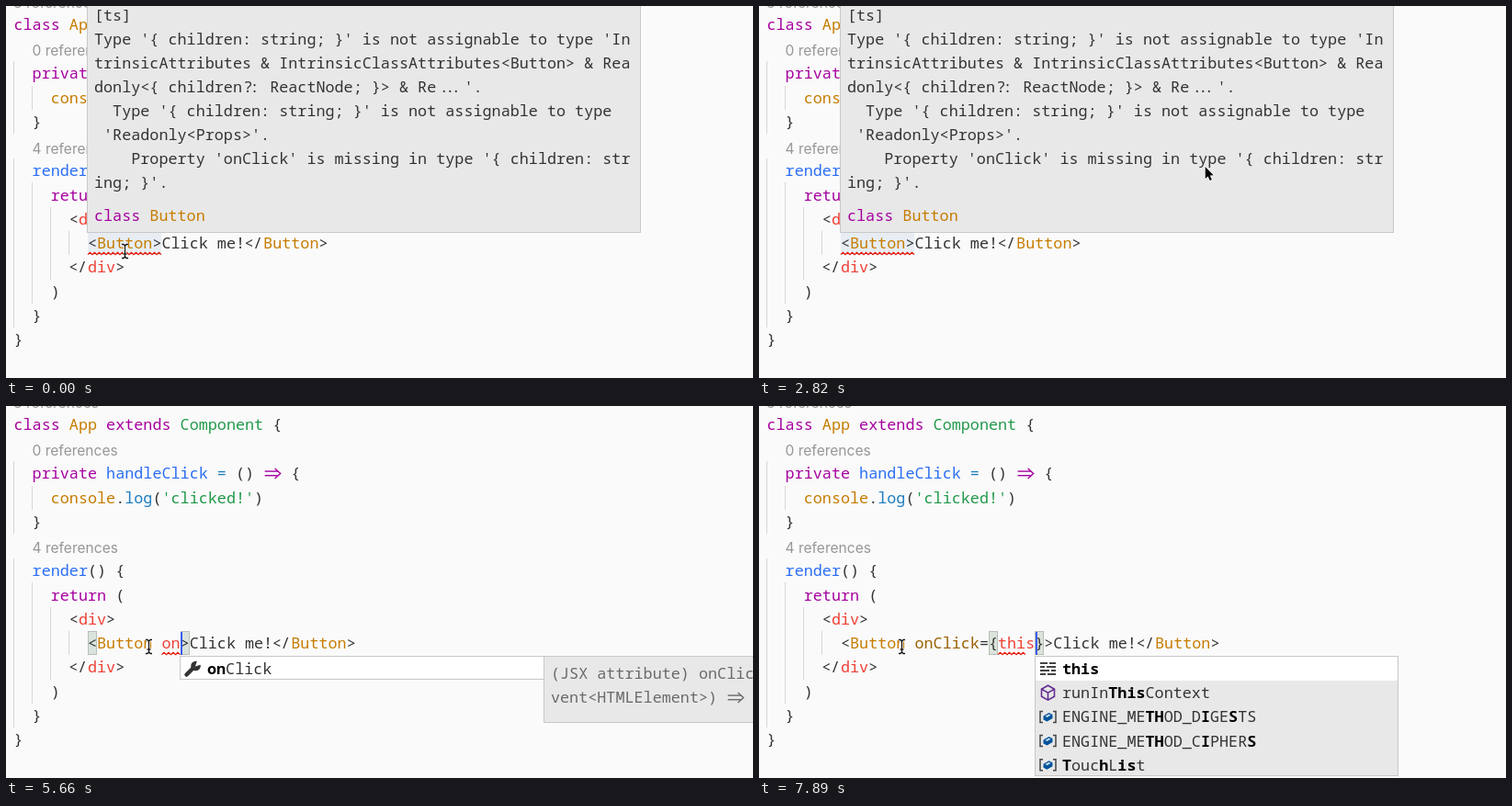
An HTML page with a canvas that plays this animation: 813 by 405 pixels, repeating every 8 s.

```html
<!DOCTYPE html>
<html lang="en">
<head>
<meta charset="utf-8">
<title>Editor: missing prop</title>
<style>
html, body { margin: 0; width: 100%; height: 100%; overflow: hidden; background: #fafafa; }
canvas { display: block; width: 813px; height: 405px; }
</style>
</head>
<body>
<canvas id="stage"></canvas>
<script>
const W = 813, H = 405, LOOP = 8000;
const ADV = 10.06, LEFT = 8.5, ROW = 26.25, CODE_Y = 264;
const MONO = '16.76px "Noto Sans Mono", "DejaVu Sans Mono", monospace';
const INK = '#333333', PURPLE = '#a6009f', ORANGE = '#c67c00', BLUE = '#2a6df5',
      GREEN = '#21994a', RED = '#ee4035', BROWN = '#986000', CYAN = '#1c7cc0';

const canvas = document.getElementById('stage');
const c = canvas.getContext('2d');
const dpr = window.devicePixelRatio || 1;
canvas.width = W * dpr;
canvas.height = H * dpr;

// Time, x, y of the pointer; each position holds until the next
const pointer = [
  [0, 129, 267], [600, 131, 243], [750, 138, 190], [900, 146, 133], [1040, 150, 164],
  [1340, 172, 165], [1490, 207, 165], [1640, 239, 165], [1790, 254, 165], [1940, 294, 167],
  [2090, 362, 169], [2240, 430, 171], [2380, 470, 171], [2530, 485, 174],
  [3270, 432, 222], [3420, 318, 284], [3570, 246, 312], [3720, 229, 315],
  [3870, 219, 309], [4020, 195, 289], [4170, 168, 270], [4320, 155, 262]
];
const edits = [
  [0, ''], [4920, ' '], [5070, ' o'], [5220, ' on'], [5810, ' onClick'], [6100, ' onClick='],
  [6550, ' onClick={}'], [7290, ' onClick={th}'], [7440, ' onClick={thi}'], [7590, ' onClick={this}']
];
const blinks = [300, 900, 1340, 1790, 2380, 2820, 3270, 3720, 4170, 4320, 4620, 6990, 7290];

const colX = col => LEFT + col * ADV;
const within = (t, a, b) => t >= a && t < b;
const at = (list, t) => list.filter(k => k[0] <= t).pop();

function box(x, y, w, h, fill, edge) {
  c.fillStyle = fill;
  c.fillRect(x, y, w, h);
  if (!edge) return;
  c.strokeStyle = edge;
  c.lineWidth = 1;
  c.strokeRect(x + .5, y + .5, w - 1, h - 1);
}

function path(points, color, width, close, fill) {
  c.beginPath();
  points.forEach(([x, y]) => c.lineTo(x, y));
  if (close) c.closePath();
  if (fill) { c.fillStyle = fill; c.fill(); }
  if (width) { c.strokeStyle = color; c.lineWidth = width; c.stroke(); }
}

function arrow(x, base, color) {
  const y = base - 5.6;
  for (const d of [-2.3, 2.3]) path([[x + 1.5, y + d], [x + 16, y + d]], color, 1.4);
  path([[x + 12.5, y - 5.5], [x + 18.5, y], [x + 12.5, y + 5.5]], color, 1.4);
}

// Offsets that pull the characters of a ligature together
const joins = { '</': [-.5, -1], '...': [3.5, 0, -3.5], '?:': [1.5, -1.5] };

// Grid text; asterisks toggle bold. Returns the x after the last character.
function put(text, x, y, color = INK) {
  let bold = false;
  c.font = MONO;
  for (const part of text.match(/<\/|=>|\.\.\.|\?:|[^]/g)) {
    if (part === '*') {
      bold = !bold;
      c.font = (bold ? 'bold ' : '') + MONO;
      continue;
    }
    c.fillStyle = bold ? '#000' : color;
    if (part === '=>') arrow(x, y, color);
    else [...part].forEach((ch, i) => c.fillText(ch, x + i * ADV + (joins[part] ? joins[part][i] : 0), y));
    x += part.length * ADV;
  }
  return x;
}

function line(col, y, ...runs) {
  let x = colX(col);
  for (const [text, color] of runs) if (text) x = put(text, x, y, color);
}

function lens(text, x, y) {
  c.font = '15.55px Inter, "Open Sans", sans-serif';
  c.fillStyle = '#979797';
  c.fillText(text, x, y);
}

function squiggle(from, to) {
  const end = colX(to), pts = [];
  for (let x = colX(from), i = 0; x <= end; x += 2.5, i++) pts.push([x, i % 2 ? 268.3 : 270.6]);
  path(pts, '#e51400', 1.2);
}

function guides() {
  const bars = [[0, 60, 139], [0, 166, 350], [1, 87, 113], [1, 192, 324], [2, 219, 298], [3, 245, 271]];
  for (const [level, top, end] of bars) box(8 + level * 20, top, 1, end - top, '#d6d6d6');
}

function staticCode(t) {
  lens('3 references', 8, 1.5);
  line(0, 26, ['class ', PURPLE], ['App ', ORANGE], ['extends ', PURPLE], ['Component', GREEN], [' {']);
  lens('0 references', 28.5, 53.9);
  line(2, 79, ['private ', PURPLE], ['handleClick ', BLUE], ['= ', CYAN], ['() '], ['=>', PURPLE], [' {']);
  line(4, 105.6, ['console', ORANGE], ['.'], ['log', CYAN], ['('], ["'clicked!'", GREEN], [')']);
  line(2, 131.8, ['}']);
  lens('4 references', 28.5, t < 5070 ? 160.9 : 160);
  line(2, CODE_Y - 3 * ROW, ['render', BLUE], ['() {']);
  line(4, CODE_Y - 2 * ROW, ['return', PURPLE], [' (']);
  line(6, CODE_Y - ROW, ['<'], ['div', RED], ['>']);
  line(6, CODE_Y + ROW, ['</'], ['div', RED], ['>']);
  line(4, CODE_Y + 2 * ROW, [')']);
  line(2, CODE_Y + 3 * ROW, ['}']);
  line(0, CODE_Y + 4 * ROW, ['}']);
}

function buttonLine(t, hover) {
  const attr = at(edits, t)[1];
  const braces = attr.includes('{');
  const clicked = t >= 4620;
  const caret = clicked ? 15 + attr.length - (braces ? 1 : 0) : 20;

  if (hover) box(89, 246, 80, 25, '#e7edf3');
  if (within(t, 4620, 4920)) box(89, 245, 123, 26, '#f2f2f2');
  if (within(t, 7290, 7440)) box(250, 245, 231, 26, '#f0f0f0');
  if (clicked) {
    for (const col of [braces ? 24 : 8, caret]) {
      box(Math.round(colX(col)), 245, 10, 26, '#dae4dc', '#b9bdb9');
    }
  }

  const [name, value = ''] = attr.split('=');
  const inner = value.slice(1, -1);
  line(8, CODE_Y,
    ['<'], ['Button', ORANGE],
    [name, name === ' onClick' ? BROWN : RED],
    [attr.includes('=') ? '=' : ''],
    [braces ? '{' : ''], [inner, inner === 'this' ? RED : INK], [braces ? '}' : ''],
    ['>Click me!'], ['</'], ['Button', ORANGE], ['>']);

  if (inner === 'this') squiggle(25, 28);
  else if (braces) squiggle(24, caret + 1);
  else if (attr.length < 2) squiggle(8, 16);
  else if (!attr.includes('=')) squiggle(16, caret);

  const shown = blinks.filter(b => b <= t).length % 2;
  if (shown) box(Math.round(colX(caret) + .4), 246, 2, 25, '#3b5bef');
}

function tooltip() {
  box(88, -2, 603, 249, '#e8e8e8', '#c8c8c8');
  [
    '[ts]',
    "Type '{ children: string; }' is not assignable to type 'In",
    'trinsicAttributes & IntrinsicClassAttributes<Button> & Rea',
    "donly<{ children?: ReactNode; }> & Re...'.",
    "  Type '{ children: string; }' is not assignable to type",
    " 'Readonly<Props>'.",
    "    Property 'onClick' is missing in type '{ children: str",
    "ing; }'."
  ].forEach((text, i) => put(text, 96, 16 + i * 26));
  put('Button', put('class ', 96, 234, PURPLE), 234, ORANGE);
}

function wrench(x, y) {
  c.lineCap = 'round';
  path([[x + 2.5, y + 14.5], [x + 10, y + 7]], '#333', 4.5);
  c.lineCap = 'butt';
  c.beginPath();
  c.arc(x + 12.5, y + 5, 5.3, 0, 7);
  c.fillStyle = '#333';
  c.fill();
  path([[x + 12, y + 5.5], [x + 14.5, y - 2], [x + 20, y + 3]], '', 0, true, '#fff');
}

function attrPopup() {
  box(189, 272, 397, 26, '#ffffff', '#c8c8c8');
  wrench(194, 278);
  put('*on*Click', 219, 292);
  box(585, 272, 240, 73, '#e8e8e8', '#c8c8c8');
  put('(JSX attribute) onClick', 593, 297, '#6a6a6a');
  put('vent<HTMLElement>) =>', 593, 323, '#6a6a6a');
}

function keywordIcon(x, y) {
  for (const [dx, dy, w] of [[0, -6, 8], [10, -6, 7], [0, -2, 5], [7, -2, 10], [0, 2, 10], [12, 2, 5], [0, 6, 6], [8, 6, 9]]) {
    box(x + dx, y + dy - 1, w, 2, '#444');
  }
}

function cubeIcon(x, y) {
  path([[x, y - 8], [x + 7, y - 4], [x + 7, y + 4], [x, y + 8], [x - 7, y + 4], [x - 7, y - 4]], '#652d90', 1.6, true);
  path([[x - 7, y - 4], [x, y], [x + 7, y - 4]], '#652d90', 1.6);
  path([[x, y], [x, y + 8]], '#652d90', 1.6);
}

function constantIcon(x, y) {
  for (const s of [-1, 1]) {
    path([[x + s * 5.5, y - 6], [x + s * 8.5, y - 6], [x + s * 8.5, y + 6], [x + s * 5.5, y + 6]], '#444', 1.5);
  }
  path([[x - 5, y - 1], [x + 1, y - 4.5], [x + 5, y - 2.5], [x + 5, y + 1.5], [x - 1, y + 5], [x - 5, y + 3]], '', 0, true, '#00539c');
  path([[x - 3, y - .7], [x + 1, y - 3], [x + 3, y - 2], [x - 1, y + .5]], '', 0, true, '#cfe0ee');
}

function valuePopup() {
  box(300, 272, 396, 131, '#e8e8e8', '#c8c8c8');
  box(301, 273, 394, 26, '#ffffff');
  [
    '*this*',
    'runIn*This*Context',
    'ENGINE_ME*TH*OD_D*I*GE*S*TS',
    'ENGINE_ME*TH*OD_C*I*PHER*S*',
    '*T*ouc*h*L*is*t'
  ].forEach((text, i) => {
    const y = 286 + i * 26.2;
    if (i === 0) keywordIcon(306, y);
    else if (i === 1) cubeIcon(314.5, y);
    else constantIcon(314.5, y);
    put(text, 330, y + 6);
  });
}

function arrowPointer(x, y) {
  const tip = [[0, 0], [0, 13], [3, 10.4], [5, 15.1], [7.2, 14.1], [5.1, 9.6], [9, 9.3]]
    .map(([a, b]) => [x + .7 + a, y + 1 + b]);
  c.lineJoin = 'round';
  path(tip, '#fff', 1.6, true);
  path(tip, '', 0, true, '#000');
  c.lineJoin = 'miter';
}

function textPointer(x, y) {
  for (const [color, w] of [['#ffffff', 3], ['#111111', 1.3]]) {
    path([[x + .5, y - 6.5], [x + .5, y + 6.5]], color, w);
    for (const s of [-1, 1]) {
      path([[x - 3, y + s * 7.5], [x - 1, y + s * 7.5], [x + .5, y + s * 6], [x + 2, y + s * 7.5], [x + 4, y + s * 7.5]], color, w);
    }
    path([[x - 1.5, y + 3], [x + 2.5, y + 3]], color, w);
  }
}

function draw(t) {
  const hover = t < 3420;
  c.setTransform(dpr, 0, 0, dpr, 0, 0);
  box(0, 0, W, H, '#fafafa');
  guides();
  staticCode(t);
  buttonLine(t, hover);
  if (hover) tooltip();
  if (within(t, 5370, 5810)) attrPopup();
  if (t >= 7740) valuePopup();
  const [, x, y] = at(pointer, t);
  if (hover && y < 246) arrowPointer(x, y);
  else textPointer(x, y);
}

const start = performance.now();
function tick() {
  draw((performance.now() - start) % LOOP);
  requestAnimationFrame(tick);
}
tick();
</script>
</body>
</html>
```
